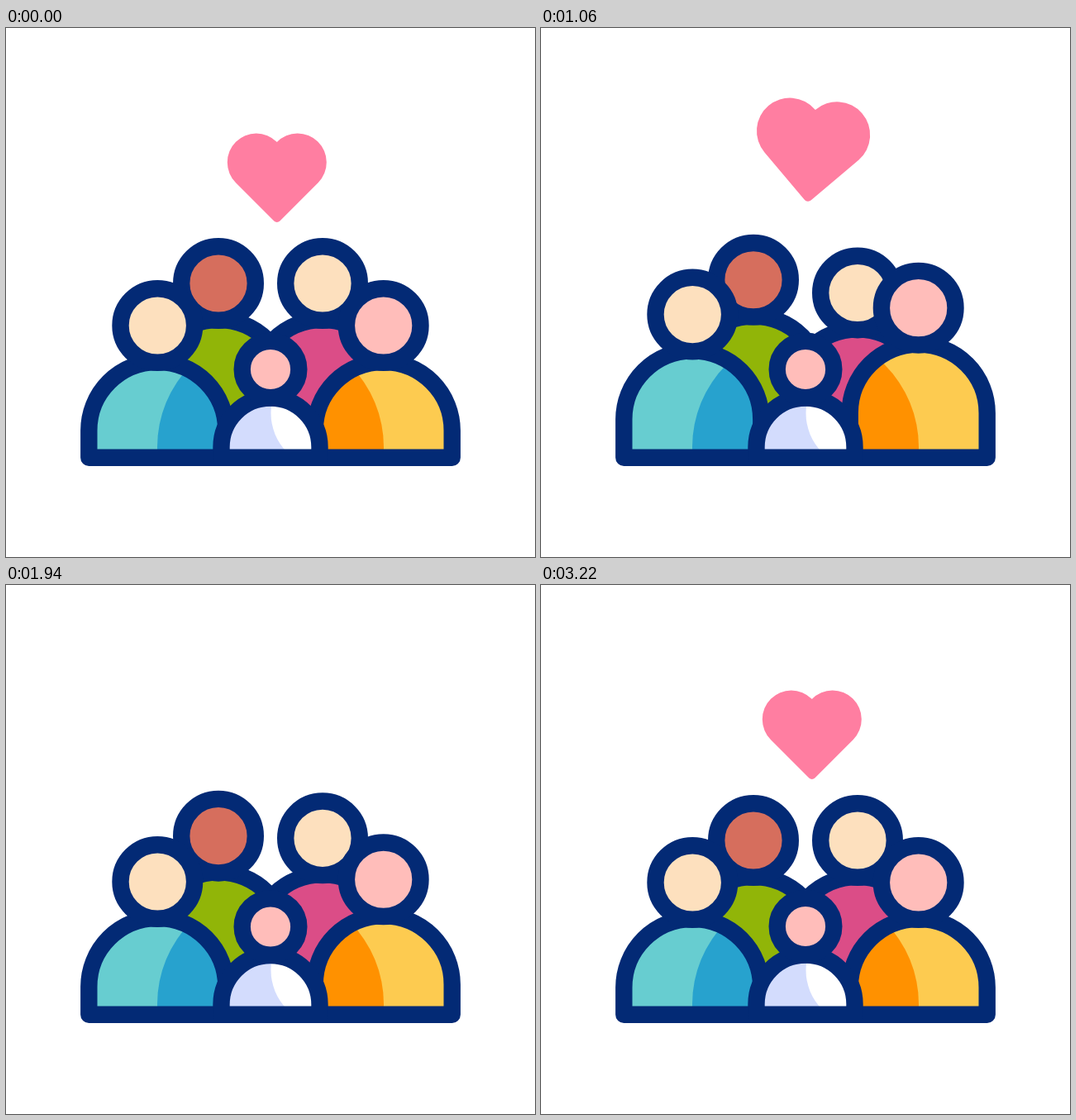
Recreate the animation shown at these times as an HTML page with a canvas. Size 640 px wide and 640 px high, loop 3300 ms.

```html
<!DOCTYPE html>
<html lang="en">
<head>
<meta charset="utf-8">
<title>Family</title>
<style>
html, body { margin: 0; width: 100%; height: 100%; overflow: hidden; background: #fff; }
canvas { display: block; width: 640px; height: 640px; }
</style>
</head>
<body>
<canvas id="stage" width="640" height="640"></canvas>
<script>
const ctx = document.getElementById('stage').getContext('2d');
const LOOP = 3300, BASE = 519.7, LINE = 20.4;
const NAVY = '#032a75', PINK = '#ff7ea1', GOLD = '#fdcb50';
const CREAM = '#fde0be', ROSE = '#ffbdba';

// One hop shared by everybody: crouch, leap, then settle
const HOP = [
  { at: 0, y: 0 }, { at: 380, y: 12.5 }, { at: 655, y: -22 }, { at: 930, y: 5 },
  { at: 1330, y: -5.6 }, { at: 1900, y: 2.5 }, { at: 2470, y: 0 }
];

const adult = { head: 44.8, body: 83, drop: 127, pace: 1 };
const child = { head: 34.3, body: 59.5, drop: 94, pace: 2.1 };

// Back to front; start is when the hop begins
const people = [
  { ...adult, x: 257, y: 309, start: 545, skin: '#d66e5d', shirt: '#91b508' },
  { ...adult, x: 383, y: 309, start: 750, skin: CREAM, shirt: '#db4d87' },
  { ...adult, x: 183.3, y: 360, start: 300, skin: CREAM, shirt: '#67cdd0',
    shade: { x: 324, y: 507, r: 141, color: '#27a2ce' } },
  { ...adult, x: 456.7, y: 360, start: 430, skin: ROSE, shirt: GOLD,
    shade: { x: 316, y: 507, r: 141, color: '#ff9100' } },
  { ...child, x: 320, y: 413, start: 1125, skin: ROSE, shirt: '#d3dcfd',
    shade: { x: 387.5, y: 466, r: 67, color: '#fff' } }
];

const part = (t, a, b) => Math.max(0, Math.min(1, (t - a) / (b - a)));
const sine = s => (1 - Math.cos(Math.PI * s)) / 2;
const mix = (a, b, s) => a + (b - a) * s;
const backOut = (s, c) => 1 + (c + 1) * (s - 1) ** 3 + c * (s - 1) ** 2;

function hop(t) {
  const i = HOP.findIndex(k => k.at > t);
  if (i < 1) return 0;
  const a = HOP[i - 1], b = HOP[i];
  return mix(a.y, b.y, sine(part(t, a.at, b.at)));
}

function disc(x, y, r) {
  ctx.beginPath();
  ctx.arc(x, y, r, 0, Math.PI * 2);
}

function fill(color) {
  ctx.fillStyle = color;
  ctx.fill();
}

function outline() {
  ctx.strokeStyle = NAVY;
  ctx.lineWidth = LINE;
  ctx.stroke();
}

function torso(p, y) {
  ctx.beginPath();
  ctx.moveTo(p.x - p.body, BASE);
  ctx.arc(p.x, y + p.drop, p.body, Math.PI, 0);
  ctx.lineTo(p.x + p.body, BASE);
  ctx.closePath();
}

function drawPerson(p, t) {
  const y = p.y + hop((t - p.start) * p.pace);
  torso(p, y);
  fill(p.shirt);
  if (p.shade) {
    ctx.save();
    ctx.clip();
    disc(p.shade.x, p.shade.y, p.shade.r);
    fill(p.shade.color);
    ctx.restore();
    torso(p, y);
  }
  outline();
  disc(p.x, y, p.head);
  fill(p.skin);
  outline();
}

function heart(y, size, angle) {
  if (size <= 0) return;
  const q = Math.PI / 4, r = 35, lobe = 25, top = -18.5;
  const notch = Math.acos(lobe / r);
  ctx.save();
  ctx.translate(327.8, y);
  ctx.rotate(angle * Math.PI / 180);
  ctx.scale(size, size);
  ctx.beginPath();
  ctx.arc(-lobe, top, r, 3 * q, -notch);
  ctx.arc(lobe, top, r, notch - Math.PI, q);
  ctx.arcTo(0, 56, -20, 36, 5);
  ctx.closePath();
  fill(PINK);
  ctx.restore();
}

function drawHeart(t) {
  if (t < 1570) {
    const s = part(t, 0, 1660);
    const rise = mix(s, sine(s), 0.35);
    const grow = 1 + 0.145 * part(t, 0, 1060) + 0.175 * sine(part(t, 1060, 1360));
    const shrink = 1 - part(t, 1360, 1570) ** 2;
    heart(181 - 49.5 * rise, grow * shrink, 7.2 * rise);
  } else {
    heart(181, backOut(part(t, 2360, 2820), 1.4), 0);
  }
}

function drawSpark(t) {
  if (t <= 1500 || t >= 1850) return;
  const outer = 56 * (1 - (1 - part(t, 1500, 1820)) ** 2.5);
  const inner = Math.min(outer, 56 * sine(part(t, 1560, 1850)));
  ctx.save();
  ctx.translate(327.7, 132);
  ctx.strokeStyle = GOLD;
  ctx.lineWidth = 20.4 * part(t, 1490, 1560) * (1 - part(t, 1800, 1852));
  ctx.lineCap = 'round';
  for (let i = 0; i < 4; i++) {
    ctx.beginPath();
    ctx.moveTo(inner, 0);
    ctx.lineTo(outer + 0.01, 0);
    ctx.stroke();
    ctx.rotate(Math.PI / 2);
  }
  ctx.restore();
}

function draw(t) {
  ctx.fillStyle = '#fff';
  ctx.fillRect(0, 0, 640, 640);
  ctx.lineJoin = 'round';
  drawHeart(t);
  drawSpark(t);
  people.forEach(p => drawPerson(p, t));
}

let start;
function tick(now) {
  if (start === undefined) start = now;
  draw((now - start) % LOOP);
  requestAnimationFrame(tick);
}
draw(0);
requestAnimationFrame(tick);
</script>
</body>
</html>
```
